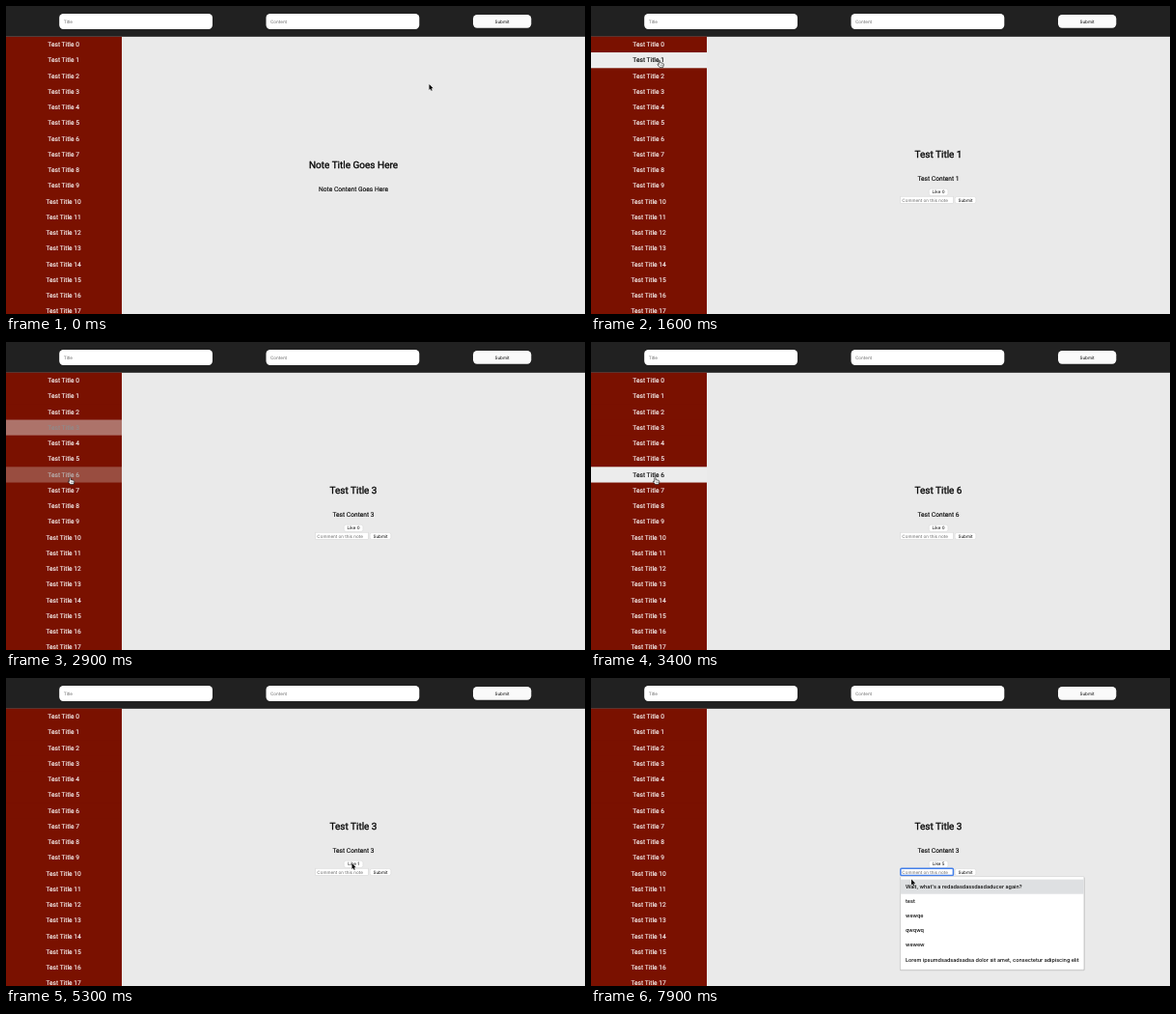
Recreate the animation shown at these times as an HTML page. Size 600 px wide and 319 px high, loop 8000 ms.

```html
<!DOCTYPE html>
<html lang="en">
<head>
<meta charset="utf-8">
<title>Notes</title>
<style>
  html, body { margin: 0; width: 100%; height: 100%; overflow: hidden; background: #eaeaea; }
  svg { display: block; width: 100%; height: 100%; text-rendering: geometricPrecision; }
  .note { font-family: Roboto, sans-serif; font-size: 6.667px; text-anchor: middle; stroke-width: .12px; }
  .heading { font-size: 10px; stroke-width: .3px; }
  .ui { font-family: Inter, sans-serif; font-size: 4.58px; }
  .mid { text-anchor: middle; }
  .hint { fill: #686868; }
  .option { font-family: Inter, sans-serif; font-size: 5.45px; font-weight: 550; }
</style>
</head>
<body>
<svg id="stage" viewBox="0 0 600 319"></svg>
<script>
const stage = document.getElementById('stage');
const LOOP = 8000, STEP = 100, FADE = 500;
const SIDEBAR = 120, ROW_TOP = 31.8, ROW_HEIGHT = 16.25, ROWS = 18;
const RED = [122, 17, 0], LIGHT = [236, 236, 236], WHITE = [255, 255, 255], BLACK = [0, 0, 0];

const START = { x: 438.5, y: 81 };
const moves = [
  { from: 100, to: 880, x: 112, y: 60 },
  { from: 880, to: 960, x: 71.5, y: 42.5 },
  { from: 1050, to: 1200, x: 71, y: 56 },
  { from: 1950, to: 2200, x: 70.5, y: 94 },
  { from: 2720, to: 2840, x: 66.5, y: 140 },
  { from: 3500, to: 3650, x: 73, y: 85.5 },
  { from: 4500, to: 5000, x: 358.5, y: 192 },
  { from: 6400, to: 6600, x: 336, y: 201 },
  { from: 7800, to: 7900, x: 332, y: 208.5 }
];
const rowClicks = [1500, 2500, 3200, 3800];
const FIRST_LIKE = 5300, MORE_LIKES = 5700, LIKE_EVERY = 200, MAX_LIKES = 5;
const FOCUS = 7200, SUGGEST = 7300, PICK = 7900;
const suggestions = [
  "Wait, what's a redadasdassdasdaducer again?", 'test', 'wewqe', 'qwqwq', 'wewew',
  'Lorem ipsumdsadsadsadsa dolor sit amet, consectetur adipiscing elit'
];

const clamp = (v, max = 1) => Math.max(0, Math.min(max, v));
const smooth = p => p * p * (3 - 2 * p);
const mix = (a, b, k) => `rgb(${a.map((v, i) => Math.round(v + (b[i] - v) * k))})`;
const bezier = (a, b, u) => 3 * u * (1 - u) ** 2 * a + 3 * u * u * (1 - u) * b + u ** 3;

// The CSS "ease" curve
function ease(p) {
  let low = 0, high = 1;
  for (let i = 0; i < 16; i++) {
    const u = (low + high) / 2;
    if (bezier(.25, .25, u) < p) low = u; else high = u;
  }
  return bezier(.1, 1, low);
}

function pointerAt(t) {
  return moves.reduce((p, m) => {
    const k = smooth(clamp((t - m.from) / (m.to - m.from)));
    return { x: p.x + (m.x - p.x) * k, y: p.y + (m.y - p.y) * k };
  }, START);
}

function rowAt(t) {
  const { x, y } = pointerAt(t);
  return x < SIDEBAR ? Math.floor((y - ROW_TOP) / ROW_HEIGHT) : -1;
}

// Stretches of time the pointer rests on one row
const hovers = [];
for (let t = 0, last = -1; t < LOOP; t += 5) {
  const row = rowAt(t);
  if (row !== last) hovers.push({ row, enter: t, leave: t });
  if (hovers.length) hovers[hovers.length - 1].leave = t + 5;
  last = row;
}

// A fade cut short also reverses in a shorter time
function hoverLevel(row, t) {
  const levels = hovers.filter(h => h.row === row && t >= h.enter).map(({ enter, leave }) => {
    const peak = ease(clamp((Math.min(t, leave) - enter) / FADE));
    return t <= leave ? peak : peak * (1 - ease(clamp((t - leave) / (FADE * peak))));
  });
  return Math.max(0, ...levels);
}

const rect = (x, y, w, h, fill, extra = '') =>
  `<rect x="${x}" y="${y}" width="${w}" height="${h}" fill="${fill}" ${extra}/>`;
const text = (x, y, cls, content) => `<text x="${x}" y="${y}" class="${cls}">${content}</text>`;
const noteText = (x, y, content, cls = '', color = '#000') =>
  `<text x="${x}" y="${y}" class="note ${cls}" fill="${color}" stroke="${color}">${content}</text>`;
const button = (x, y, w, label, fill = '#fff') =>
  rect(x, y, w, 7, fill, 'rx="2" stroke="#cfcfcf" stroke-width=".4"') +
  text(x + w / 2, y + 5.1, 'ui mid', label);

function header() {
  const field = (x, label) =>
    rect(x, 7.9, 158.8, 16.1, '#fff', 'rx="4.2"') + text(x + 4.5, 17.7, 'ui hint', label);
  return rect(0, 0, 600, ROW_TOP, '#212121') + field(55.2, 'Title') + field(269.5, 'Content') +
    rect(484, 9.1, 60.3, 13.7, '#fafafa', 'rx="4.2"') + text(514, 17.7, 'ui mid', 'Submit');
}

function sidebar(t) {
  let out = rect(0, ROW_TOP, SIDEBAR, 319 - ROW_TOP, mix(RED, RED, 0));
  for (let i = 0; i < ROWS; i++) {
    const level = hoverLevel(i, t), top = ROW_TOP + i * ROW_HEIGHT;
    if (level > 0) out += rect(0, top, SIDEBAR, ROW_HEIGHT, mix(RED, LIGHT, level));
    out += noteText(59.6, top + 10.4, `Test Title ${i}`, '', mix(WHITE, BLACK, level));
  }
  return out;
}

function note(t) {
  const opened = rowClicks.filter(at => t >= at).pop();
  if (!opened) {
    return noteText(360, 168.4, 'Note Title Goes Here', 'heading') +
      noteText(360, 192.1, 'Note Content Goes Here');
  }
  const row = rowAt(opened);
  const repeat = (t - MORE_LIKES) / LIKE_EVERY;
  const likes = t < FIRST_LIKE ? 0 : 1 + clamp(Math.floor(repeat + .5), MAX_LIKES - 1);
  const pressed = repeat >= 0 && repeat < MAX_LIKES - 1 && repeat % 1 < .5;
  const focused = t >= FOCUS;
  const border = focused ? 'rx="1" stroke="#4580ea" stroke-width="1.5"' : 'stroke="#d0d0d0" stroke-width=".5"';
  const caret = focused && (t - FOCUS) % 1000 < 500 ? rect(321.7, 198.6, .5, 5, '#000') : '';
  return noteText(360, 157.4, `Test Title ${row}`, 'heading') +
    noteText(360, 180.8, `Test Content ${row}`) +
    button(350.3, 189.3, 19.6, `Like ${likes}`, pressed ? '#dcdcdc' : '#fff') +
    rect(320.8, 197.2, 54.6, 7.4, '#fff', border) +
    text(322.3, 202.7, 'ui hint', 'Comment on this note') + caret +
    button(377.2, 197.5, 21.6, 'Submit');
}

function dropdown(t) {
  if (t < SUGGEST) return '';
  const items = suggestions.map((s, i) => text(326, 218 + i * 15.1, 'option', s)).join('');
  return rect(319.9, 206, 191.8, 97.2, '#000', 'rx="1.5" opacity=".14"') +
    rect(320.5, 205.6, 190.4, 96.6, '#fff', 'rx="1" stroke="#c4c4c4" stroke-width=".5"') +
    (t >= PICK ? rect(320.7, 208.6, 190, 15.1, '#dee0e2') : '') +
    `<clipPath id="list"><rect x="320" y="206" width="186" height="96"/></clipPath>
     <g clip-path="url(#list)">${items}</g>`;
}

function pointer(t) {
  const { x, y } = pointerAt(t);
  const shape = (d, style) => `<path transform="translate(${x} ${y})" d="${d}" ${style}/>`;
  if (x < SIDEBAR) {
    return shape('M-.7 .7Q0-.3 .6 .7V2.7L3.6 3.3Q4.5 3.7 4.3 5L3.6 7.6H.2L-1.9 5Q-2.4 4-1.4 4L-.7 4.6Z',
      'fill="#fff" stroke="#000" stroke-width=".6"') +
      shape('M.9 4.6V6.3M2 4.6V6.3M3 4.6V6.3', 'stroke="#000" stroke-width=".35"');
  }
  if (y > 197 && y < 205) {
    return shape('M-1-3.2Q0-3.2 0-2.5Q0-3.2 1-3.2M0-2.5V2.5M-1 3.2Q0 3.2 0 2.5Q0 3.2 1 3.2',
      'fill="none" stroke="#000" stroke-width=".5"');
  }
  return shape('M0 0V5.9L1.3 4.7L2.2 6.8L3.2 6.4L2.3 4.3H4.2Z',
    'fill="#000" stroke="#fff" stroke-width=".5" paint-order="stroke"');
}

let shown = -1;
function frame(now) {
  const t = Math.floor(now % LOOP / STEP) * STEP;
  if (t !== shown) {
    shown = t;
    stage.innerHTML = rect(0, 0, 600, 319, '#eaeaea') + header() + sidebar(t) + note(t) + dropdown(t) + pointer(t);
  }
  requestAnimationFrame(frame);
}
frame(0);
</script>
</body>
</html>
```
